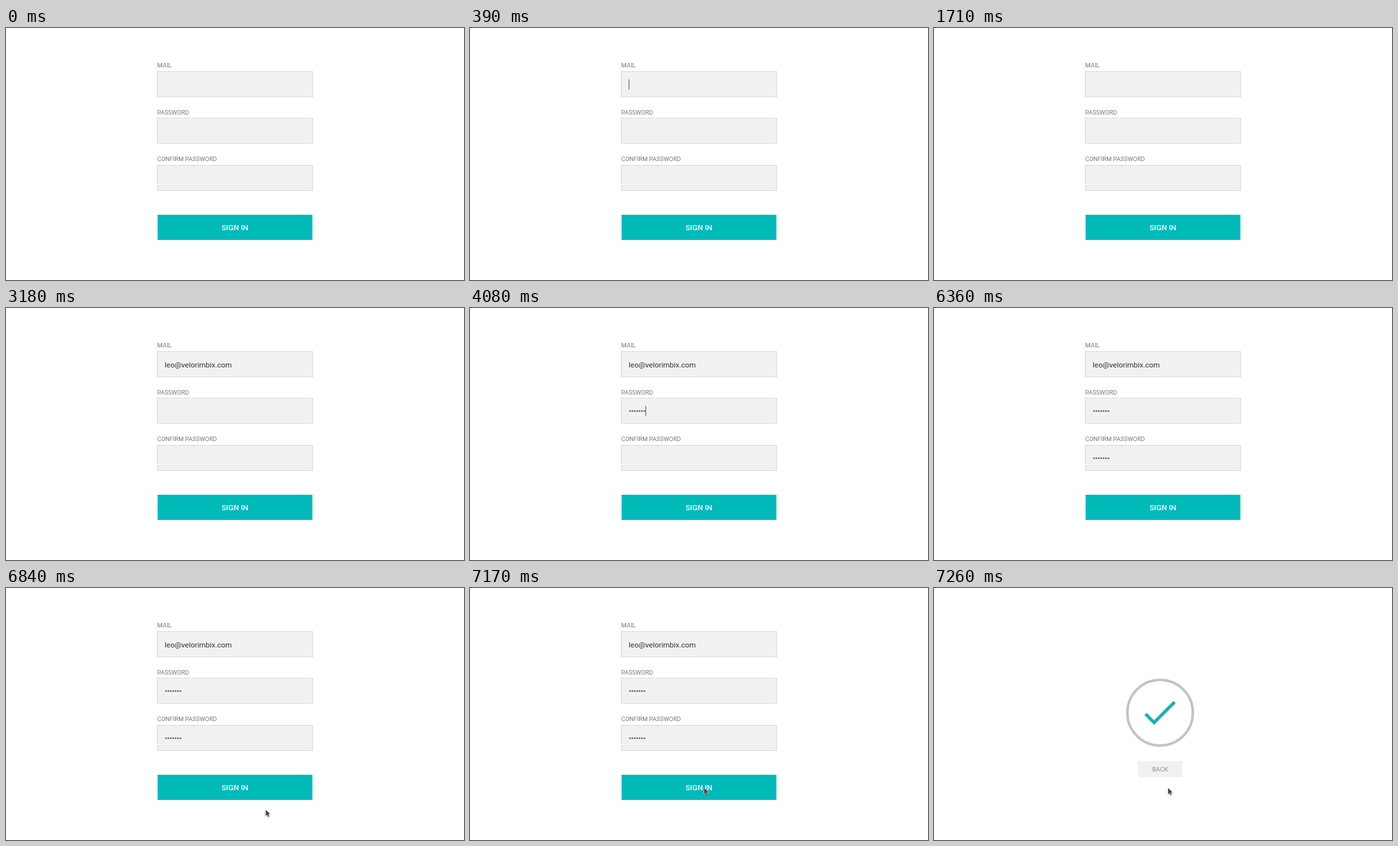
Animation, 710 px wide and 390 px high, one loop 8 s. Source, as an HTML page:

```html
<!DOCTYPE html>
<html lang="en">
<head>
<meta charset="utf-8">
<title>Sign in form</title>
<style>
  html, body { margin: 0; width: 100%; height: 100%; overflow: hidden; background: #fff; }
  svg { display: block; width: 710px; height: 390px; font: 9.35px Roboto, sans-serif; fill: #777; }
  .field { fill: #f0f2f1; stroke: #d6dad9; }
  .button { font-size: 11.8px; font-weight: 500; fill: #fff; text-anchor: middle; }
  .back { font-size: 9.5px; fill: #888; text-anchor: middle; }
  #mail { font-size: 11.5px; fill: #333; }
  #caret { fill: #555; }
  .dots { fill: #606060; }
  #pointer { fill: #444; stroke: #fff; paint-order: stroke; filter: drop-shadow(0 1px 1px #0004); }
</style>
</head>
<body>
<svg viewBox="0 0 710 390">
  <g id="form">
    <text x="234.6" y="61">MAIL</text>
    <text x="234.6" y="134">PASSWORD</text>
    <text x="234.6" y="206">CONFIRM PASSWORD</text>
    <rect class="field" x="234.5" y="67.5" width="241" height="39"/>
    <rect class="field" x="234.5" y="139.5" width="241" height="39"/>
    <rect class="field" x="234.5" y="212.5" width="241" height="39"/>
    <rect x="235" y="289" width="240" height="39" fill="#00baba"/>
    <text class="button" x="355" y="313">SIGN IN</text>
    <text id="mail" x="246" y="92"></text>
    <g id="password" class="dots"></g>
    <g id="confirm" class="dots"></g>
    <rect id="caret" width="1"/>
  </g>
  <g id="success">
    <circle cx="350.5" cy="193" r="50.8" fill="none" stroke="#c3c3c3" stroke-width="4"/>
    <path d="M328 195 L341.2 208.3 L373 176.5" fill="none" stroke="#1cb0b3" stroke-width="5"/>
    <rect x="316" y="268" width="69" height="25" fill="#f0f2f1"/>
    <text class="back" x="350.5" y="284">BACK</text>
  </g>
  <path id="pointer" d="M0 0V9.5L2.2 7.5L3.8 11L5.4 10.3L3.9 6.9H6.8Z"/>
</svg>
<script>
const LOOP = 8000, SUBMIT = 7260;
const $ = id => document.getElementById(id);
const [form, success, mail, password, confirmation, caret, pointer] =
  ['form', 'success', 'mail', 'password', 'confirm', 'caret', 'pointer'].map($);

const ADDRESS = 'leo@velorimbix.com';
const LEFT = 246, DOT_STEP = 3.72;

// Moments at which each chunk or dot is typed
const mailKeys = [1860, 1920, 1950, 2010];
const passwordKeys = [3390, 3510, 3630, 3780, 3870, 3990, 4080];
const confirmKeys = [5520, 5580, 5670, 5820, 5940, 6030, 6150];

// Caret: [on, off, field index]
const caretSpans = [
  [360, 810, 0], [1260, 1710, 0], [1860, 2430, 0],
  [2730, 3180, 1], [3390, 4290, 1],
  [4470, 4920, 2], [5370, 6360, 2]
];
const caretBoxes = [[79.5, 15.5], [151.5, 15.5], [225, 15]];

// Pointer tip: [time, x, y]
const route = [[6570, 603, 336], [6840, 403, 343.5], [7080, 363, 309.5]];

const typed = (keys, t) => keys.filter(k => t >= k).length;
const show = (el, on) => el.setAttribute('display', on ? 'inline' : 'none');

function addDots(group, y) {
  for (let i = 0; i < 7; i++)
    group.innerHTML += `<circle cx="${LEFT + 2 + i * DOT_STEP}" cy="${y}" r="1.35"/>`;
}

function showDots(group, count) {
  [...group.children].forEach((dot, i) => show(dot, i < count));
}

function pointerAt(t) {
  const i = t < route[1][0] ? 0 : 1;
  const [t0, x0, y0] = route[i], [t1, x1, y1] = route[i + 1];
  const p = Math.min(1, (t - t0) / (t1 - t0)), e = p * (2 - p);
  return [x0 + (x1 - x0) * e, y0 + (y1 - y0) * e];
}

function draw(t) {
  show(form, t < SUBMIT);
  show(success, t >= SUBMIT);

  const chars = Math.round(ADDRESS.length * typed(mailKeys, t) / mailKeys.length);
  const counts = [0, typed(passwordKeys, t), typed(confirmKeys, t)];
  mail.textContent = ADDRESS.slice(0, chars);
  showDots(password, counts[1]);
  showDots(confirmation, counts[2]);

  const span = caretSpans.find(([on, off]) => t >= on && t < off);
  show(caret, span);
  if (span) {
    const field = span[2], [y, height] = caretBoxes[field];
    const width = field ? counts[field] * DOT_STEP : chars && mail.getComputedTextLength();
    caret.setAttribute('x', Math.round(LEFT + width));
    caret.setAttribute('y', y);
    caret.setAttribute('height', height);
  }

  show(pointer, t >= route[0][0]);
  if (t >= route[0][0]) pointer.setAttribute('transform', `translate(${pointerAt(t)})`);
}

addDots(password, 159.5);
addDots(confirmation, 232.5);

function tick() {
  draw(performance.now() % LOOP);
  requestAnimationFrame(tick);
}
tick();
</script>
</body>
</html>
```
